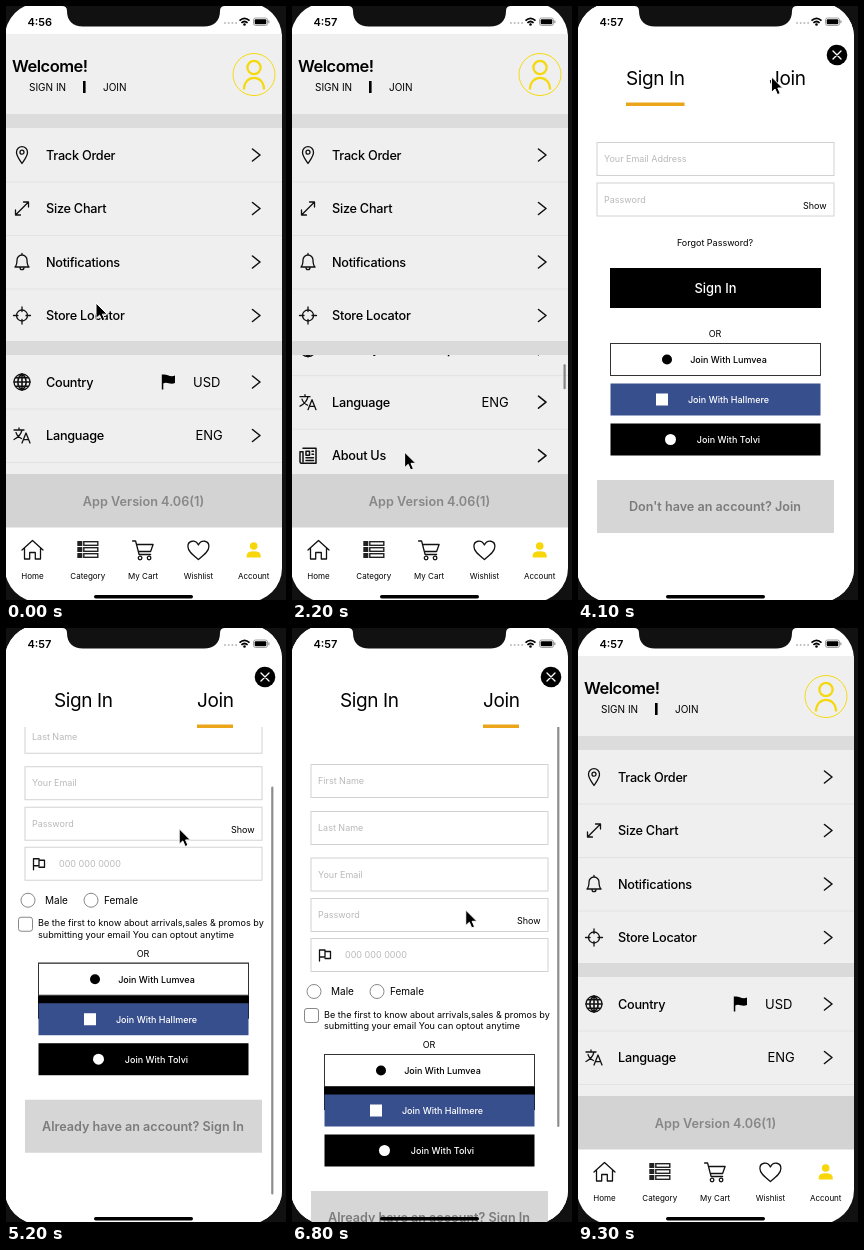
Recreate the animation shown at these times as an HTML page. Size 280 by 594 pixels, loop 9.4 s.

```html
<!DOCTYPE html>
<html lang="en">
<head>
<meta charset="utf-8">
<title>Account screen</title>
<style>
  html, body { margin: 0; width: 100%; height: 100%; overflow: hidden; background: #111; }
  svg { display: block; width: 280px; height: 594px; font-family: Inter, "Open Sans", sans-serif; }
  .line { fill: none; stroke: #111; stroke-width: 1.3; stroke-linecap: round; stroke-linejoin: round; }
</style>
</head>
<body>
<svg id="stage" viewBox="0 0 280 594"></svg>
<script>
const LOOP = 9400, ROW = 53.5, MAX_SCROLL = 414.5;
const stage = document.getElementById('stage');

// Drawing helpers
const rect = (x, y, w, h, fill, more = '') =>
  `<rect x="${x}" y="${y}" width="${w}" height="${h}" fill="${fill}" ${more}/>`;
const text = (x, y, size, str, more = '') =>
  `<text x="${x}" y="${y}" font-size="${size}" ${more}>${str}</text>`;
const line = (d, more = '') => `<path class="line" d="${d}" ${more}/>`;
const dot = (x, y, r, more = '') => `<circle cx="${x}" cy="${y}" r="${r}" ${more}/>`;
const at = (x, y, body, more = '') => `<g transform="translate(${x} ${y})" ${more}>${body}</g>`;
const mid = 'text-anchor="middle"';
const ring = 'class="line"';

// Icons are centred on 0,0
const icons = {
  pin: line('M0 8.5C-3 4-5.5 1-5.5-2.8a5.5 5.5 0 0 1 11 0C5.5 1 3 4 0 8.5z') + dot(0, -2.8, 2, ring),
  resize: line('M-6 6L6-6M1.5-6.5H6.5V-1.5M-6.5 1.5V6.5H-1.5'),
  bell: line('M-7 5C-5 3-5 1-5-2a5 5 0 0 1 10 0C5 1 5 3 7 5zM-2 5.5a2 2.2 0 0 0 4 0M0-7V-8.5'),
  target: dot(0, 0, 5.5, ring) + line('M0-8.5V-4M0 8.5V4M-8.5 0H-4M8.5 0H4'),
  globe: dot(0, 0, 8, ring) + line('M-8 0H8M0-8V8M-6.5-4.2H6.5M-6.5 4.2H6.5M0-8C-5.5-4-5.5 4 0 8C5.5 4 5.5-4 0-8',
    'style="stroke-width:1.6"'),
  language: line('M-8-5.5H2M-3-7.5V-5.5M0-5.5C-1-1-4 2-8 4M-6-3C-5 0-3 2-.5 3M0 7.5L4-2.5L8 7.5M1.4 4.2H6.6'),
  news: line('M-5-7.5H8V7.5H-6.5Q-8 7.5-8 6V-4H-5V6M-2-4.5H1.5V-.5H-2zM4-4.5H5.5M4-1.5H5.5M-2 2H5.5M-2 4.8H5.5',
    'style="stroke-width:1.5"'),
  mail: line('M-8-6H8V6H-8zM-8-5.5L0 1L8-5.5')
};

const label = 'font-weight="500" letter-spacing="-.25"';
const chevron = line('M-3.5-6L4 0L-3.5 6', 'style="stroke-width:1.6"');
const row = (y, icon, name, extra = '') => at(0, y,
  at(16, 0, icons[icon]) + text(40, 4.7, 12.7, name, label) + extra +
  at(250, 0, chevron) + rect(0, 26.5, 276, 1, '#e3e3e3'));

const topRows = [['pin', 'Track Order'], ['resize', 'Size Chart'], ['bell', 'Notifications'], ['target', 'Store Locator']];
const flag = '<path d="M156-7V7.5H157.6V1.5C161-.5 164 3 169 .8V-6.4C164-4.5 161-8-156-7z" fill="none"/>' +
  '<path d="M155.8-7.5H157.3C161-8 164-4.6 169-6.4V1C164 3 161-.6 157.3 1.4V7.5H155.8z"/>';
const moreRows = [
  ['globe', 'Country', flag + text(187, 4.5, 13, 'USD')],
  ['language', 'Language', text(189.5, 4.5, 13, 'ENG')],
  ['news', 'About Us'], ['bell', 'Contact Us'], ['news', 'FAQs'], ['pin', 'Shipping'],
  ['resize', 'Returns'], ['news', 'Privacy Policy'], ['news', 'Terms &amp; Conditions'], ['mail', 'Send us An Email']
];

const tabs = [
  ['Home', line('M-10.5 0L0-9.5L10.5 0M-8-2V9H-2.8V2.5H2.8V9H8V-2')],
  ['Category', [-9, -3, 3].map(y => rect(-10.5, y, 5, 5, '#222') +
    rect(-4, y + .7, 14, 3.6, 'none', 'stroke="#222" stroke-width="1.4"')).join('')],
  ['My Cart', line('M-10.5-9H-7.5L-4 4.5H7.5M-6.5-5.5H10L7.5 1.5H-4.8') + dot(-3, 8, 1.8, ring) + dot(6, 8, 1.8, ring)],
  ['Wishlist', line('M0 9.5C-6 4.5-10.5 1-10.5-3.5C-10.5-9.5-3-11 0-5C3-11 10.5-9.5 10.5-3.5C10.5 1 6 4.5 0 9.5z')],
  ['Account', '<path d="M-7 7.5V5.5Q-7 1.2 0 1.2T7 5.5V7.5z" fill="#f7d60a"/>' + dot(0, -4, 3.8, 'fill="#f7d60a"')]
];

const home =
  rect(0, 0, 280, 594, '#fff') + rect(0, 28, 276, 440, '#efefef') +
  text(6, 66, 16.5, 'Welcome!', 'font-weight="600" letter-spacing="-.5"') +
  text(23, 85, 10, 'SIGN IN', 'id="signLink"') + rect(77, 75, 2.6, 12, '#000') + text(97, 85, 10, 'JOIN') +
  `<g fill="none" stroke="#f5d90f">${dot(248, 68.5, 21)}<g stroke-width="2.3">${dot(248, 61.5, 6.6)}
    <path d="M238 83.500C238 68 258 68 258 83.500"/></g></g>` +
  rect(0, 108, 276, 14, '#dcdcdc') +
  topRows.map(([icon, name], i) => row(149 + i * ROW, icon, name)).join('') +
  rect(0, 335, 276, 14, '#dadada') +
  `<g clip-path="url(#listClip)"><g id="list">${
    moreRows.map(([icon, name, extra], i) => row(376 + i * ROW, icon, name, extra)).join('')}</g>` +
  rect(271.5, 0, 2.2, 25, '#858585', 'id="listBar" rx="1.1"') + '</g>' +
  rect(0, 468, 276, 53.5, '#d3d3d3') +
  text(137.5, 499.500, 12.7, 'App Version 4.06(1)', mid + ' font-weight="600" fill="#878787"') +
  tabs.map(([name, icon], i) => at(26.5 + i * 55.3, 544, icon + text(0, 29, 8, name, mid))).join('');

// Sign-in / join sheet
const field = (y, hint, x = 26) =>
  rect(19, y, 237, 33, '#fff', 'stroke="#d2d2d2"') + text(x, y + 19.5, 9, hint, 'fill="#b9b9b9"');
const password = y => field(y, 'Password') + text(225, y + 25.5, 9, 'Show');
const button = (y, h, name) => rect(32, y, 211, h, '#000') +
  text(137.5, y + h / 2 + 4.7, 12.9, name, mid + ' fill="#fff" font-weight="500"');
const social = (y, fill, ink, mark, name, stroke = 'none') =>
  rect(32.500, y + .5, 210, 32, fill, `stroke="${stroke}"`) + at(0, y + 16.5, mark) +
  text(150.5, y + 19.8, 9, 'Join With ' + name, `${mid} fill="${ink}" font-weight="500"`);
const footer = (y, prompt) =>
  text(137, y - 6, 9, 'OR', mid) +
  social(y, '#fff', '#000', dot(89, 0, 5), 'Lumvea', '#333') +
  social(y + 40, '#384f8e', '#fff', rect(78, -6, 12, 12, '#fff'), 'Hallmere') +
  social(y + 80, '#000', '#fff', dot(92.5, 0, 5.5, 'fill="#fff"'), 'Tolvi') +
  rect(19, y + 137, 237, 53, '#d6d6d6') +
  text(137, y + 168, 12.6, prompt, mid + ' font-weight="600" fill="#7b7b7b"');

const signPage = field(136.5, 'Your Email Address') + password(177) +
  text(137, 239.500, 9, 'Forgot Password?', mid) + button(262, 40, 'Sign In') +
  footer(337, "Don't have an account? Join");

const radio = (x, name) => dot(x, 363.5, 7, 'fill="#fff" stroke="#888"') + text(x + (x < 50 ? 17 : 13), 367.3, 10, name);
const joinPage = field(136.5, 'First Name') + field(183.5, 'Last Name') + field(230, 'Your Email') +
  password(270.5) + field(310.5, '000 000 0000', 53) +
  line('M27.500 333V322H33V329H27.500M33 323.500H38.500V330.500H33') +
  radio(22, 'Male') + radio(85, 'Female') +
  rect(12.5, 380.5, 14, 14, '#fff', 'stroke="#888" rx="2.5"') +
  text(32, 389.5, 9.1, 'Be the first to know about arrivals,sales &amp; promos by') +
  text(32, 401, 9.1, 'submitting your email You can optout anytime') +
  button(426, 56, 'Join Now') + footer(426, 'Already have an account? Sign In');

const tab = (id, x, w, name) => `<g id="${id}Tab">${text(x, 79, 19, name, 'letter-spacing="-.4"')}` +
  rect(x, 96.5, w, 3.5, '#eba51a', `id="${id}Line"`) + '</g>';
const sheet = rect(0, 0, 280, 594, '#fff') +
  `<g clip-path="url(#pageClip)"><g id="signPage">${signPage}</g><g id="joinPage">${joinPage}</g>` +
  rect(265.2, 0, 2.2, 408, '#8d8d8d', 'id="pageBar" rx="1.1"') + '</g>' +
  tab('sign', 48, 58.5, 'Sign In') + tab('join', 191, 36, 'Join') +
  dot(259, 49, 10.3) + line('M255 45L263 53M263 45L255 53', 'style="stroke:#fff"');

const status =
  text(21.5, 19.7, 11, '', 'id="clock" font-weight="600"') +
  [219, 222.7, 226.4, 230.1].map(x => dot(x, 17, 1, 'fill="#bbb"')).join('') +
  '<g fill="none" stroke="#000" stroke-width="1.7"><path d="M233.500 14.700Q238.500 10.200 243.500 14.700M235.400 16.800Q238.500 14.200 241.600 16.800"/></g>' +
  dot(238.500, 18.500, 1.3) +
  rect(247.5, 12, 14, 7.5, 'none', 'rx="2" stroke="#888" stroke-width=".8"') +
  rect(248.7, 13.2, 11.6, 5.1, '#000', 'rx="1"') + rect(262.3, 14.3, 1.1, 3, '#888', 'rx=".5"');

stage.innerHTML = `<defs>
    <clipPath id="screen">${rect(-1, -3, 277, 599, '#000', 'rx="34"')}</clipPath>
    <clipPath id="listClip">${rect(0, 349, 276, 119, '#000')}</clipPath>
    <clipPath id="pageClip">${rect(0, 99, 280, 495, '#000')}</clipPath>
  </defs>` +
  rect(0, 0, 280, 594, '#111') +
  `<g clip-path="url(#screen)">${home}<g id="sheet">${sheet}</g>${status}` +
  rect(88, 589, 99, 3.5, '#000', 'rx="1.7"') + '</g>' +
  '<path d="M56 0Q61 0 61 5C61 15 67 20.500 77 20.500H198C208 20.500 214 15 214 5Q214 0 219 0z" fill="#111"/>' +
  '<path id="cursor" d="M0 0V15.500L3.600 12.200L6 17.800L8.800 16.600L6.400 11.200H11.200z" fill="#000" stroke="#fff" stroke-width="1"/>';

const ui = {};
stage.querySelectorAll('[id]').forEach(el => ui[el.id] = el);

// Keyframes: [time, values, easing into this key]
const smooth = p => p * p * (3 - 2 * p);
const linear = p => p;
const out = p => 1 - (1 - p) ** 2;
const cubicOut = p => 1 - (1 - p) ** 3;

function track(t, keys) {
  if (t <= keys[0][0]) return keys[0][1];
  for (let i = 1; i < keys.length; i++) {
    const [end, b, ease = smooth] = keys[i];
    if (t < end) {
      const [start, a] = keys[i - 1];
      const p = ease((t - start) / (end - start));
      return Array.isArray(a) ? a.map((v, k) => v + (b[k] - v) * p) : a + (b - a) * p;
    }
  }
  return keys[keys.length - 1][1];
}

const cursorPath = [
  [200, [90, 297]], [600, [112, 450]], [850, [114, 395]], [1350, [114, 435]], [1500, [114, 425]],
  [1650, [114, 425]], [1900, [116, 480]], [2300, [112, 440]], [2950, [47, 81]], [3350, [47, 81]],
  [4250, [205, 70]], [4450, [205, 70]], [4850, [150, 292]], [5200, [173, 201], linear],
  [5900, [242, 109], out], [6200, [225, 115]], [6700, [180, 299]], [7300, [97, 75]], [7600, [97, 75]],
  [8000, [254, 44]], [8200, [254, 44]], [8550, [290, -22]]
];
const listScroll = [[600, 0], [850, 55], [1300, MAX_SCROLL, cubicOut],
  [1650, MAX_SCROLL], [1900, MAX_SCROLL - 55], [2450, 0, cubicOut]];
const pageScroll = [[4850, 0], [5200, 91, linear], [5900, 184, out], [6200, 184], [6700, 0]];
const sheetY = [[3400, 594], [3900, 0, cubicOut], [8250, 0], [8700, 594]];
const press = t => [[t, 1], [t + 60, .22], [t + 150, .22], [t + 400, 1]];
const fade = (from, to) => [[from, 0], [from + 100, 1], [to, 1], [to + 250, 0]];

const move = (el, x, y) => el.setAttribute('transform', `translate(${x} ${y})`);
const show = (el, on) => el.setAttribute('visibility', on ? 'inherit' : 'hidden');
const alpha = (el, v) => el.setAttribute('opacity', v);

function draw(t) {
  const scroll = track(t, listScroll), page = track(t, pageScroll), y = track(t, sheetY);
  const joining = t >= 4400 && t < 7400;

  ui.clock.textContent = t < 500 ? '4:56' : '4:57';
  move(ui.list, 0, -scroll);
  move(ui.listBar, 0, 351 + scroll / MAX_SCROLL * 90);
  alpha(ui.listBar, track(t, fade(550, 3350)));
  alpha(ui.signLink, track(t, press(3060)));

  move(ui.sheet, 0, y);
  show(ui.sheet, y < 594);
  show(ui.signPage, !joining);
  show(ui.joinPage, joining);
  show(ui.signLine, !joining);
  show(ui.joinLine, joining);
  alpha(ui.joinTab, track(t, press(4300)));
  alpha(ui.signTab, track(t, press(7280)));
  move(ui.joinPage, 0, -page);
  move(ui.pageBar, 0, 91 + page * .74);
  alpha(ui.pageBar, track(t, fade(4800, 6900)));

  move(ui.cursor, ...track(t, cursorPath));
}

const begin = performance.now();
function tick() {
  draw((performance.now() - begin) % LOOP);
  requestAnimationFrame(tick);
}
draw(0);
requestAnimationFrame(tick);
</script>
</body>
</html>
```
